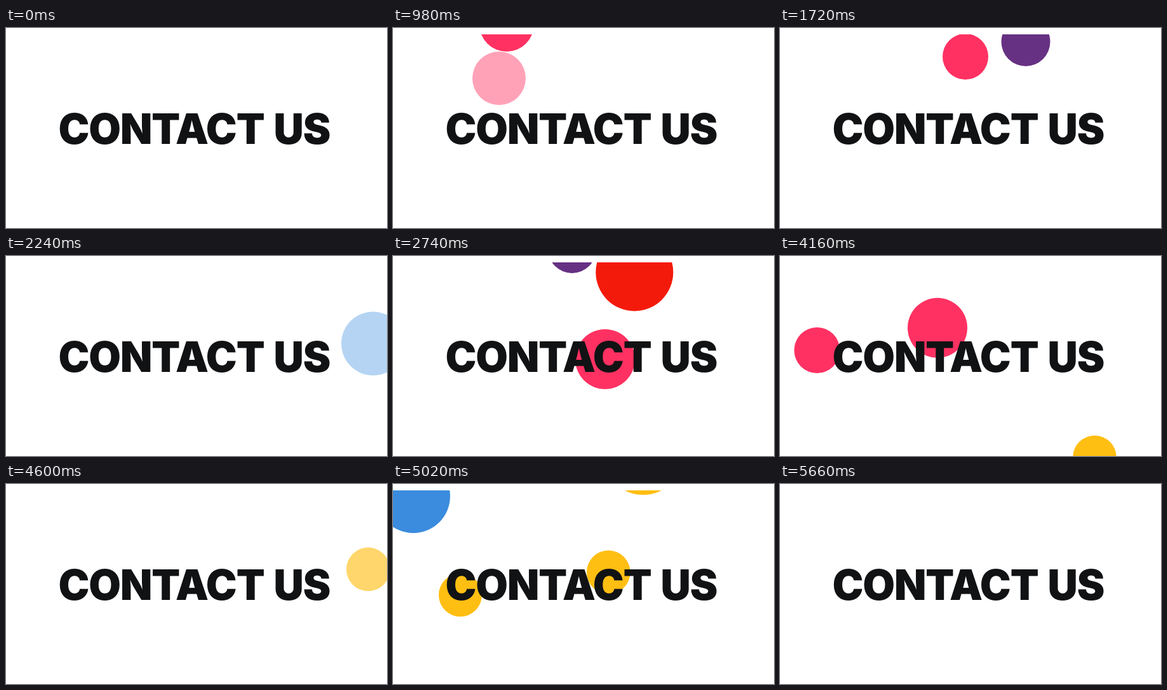
Write an HTML page with a canvas that moves like this. It is 600x314 px and loops after 5700 ms.

```html
<!DOCTYPE html>
<html lang="en">
<head>
<meta charset="utf-8">
<title>Contact us</title>
<style>
  html, body { margin: 0; width: 100%; height: 100%; overflow: hidden; background: #fff; }
  canvas, svg { position: absolute; left: 0; top: 0; width: 600px; height: 314px; }
  text { font: 900 65.5px Inter, "Liberation Sans", sans-serif; letter-spacing: -1.1px; word-spacing: 3px; fill: #111214; }
</style>
</head>
<body>
<canvas width="600" height="314"></canvas>
<svg viewBox="0 0 600 314"><text x="82.4" y="181.8">CONTACT US</text></svg>
<script>
const LOOP = 5700, STEP = 20, CUT = 5660;
const TOP = 10, GRAVITY = 0.0016, ENTRY = 0.25, FADE = 80;
const PINK = '#ff3162', RED = '#f41a0b', PURPLE = '#673183', YELLOW = '#ffbe12', BLUE = '#3b8cde';

// A ball passes (x, y) at time t; by default it has fallen there from the top edge.
function ball(t, x, y, r, color, vx, end = LOOP, vy) {
  vy ??= Math.sqrt(ENTRY ** 2 + 2 * GRAVITY * (y - TOP + r));
  return { t, x, y, r, color, vx, vy, end, start: t - Math.max(0, vy) / GRAVITY };
}

// A ball that enters over the top edge at time t.
const drop = (t, x, r, color, vx, end) => ball(t, x, TOP - r, r, color, vx, end);

const balls = [
  drop(60, 380, 42, PINK, 0.4, 500),
  drop(320, 215, 42, YELLOW, -0.12),
  drop(420, 500, 50, BLUE, 0.2, 900),
  ball(980, 167, 79, 42, PINK, -0.05, 1016),
  ball(980, 179, -6, 43, PINK, -0.12),
  drop(1040, 520, 45, RED, 0.13),
  ball(1720, 292, 45, 36, PINK, -0.3, 1920),
  ball(1720, 387, 21.5, 38.5, PURPLE, 0.3, 1960),
  drop(1740, 90, 40, YELLOW, -0.16, 2110),
  drop(1900, 510, 50, BLUE, 0.2, 2270),
  drop(2250, 70, 40, PINK, -0.12, 2660),
  drop(2330, 485, 45, YELLOW, 0.12, 2700),
  ball(2740, 334, 162, 47, PINK, -0.15),
  ball(2740, 282, -11, 38, PURPLE, -0.2),
  ball(2740, 380.3, 25.5, 61, RED, 0.2),
  drop(2960, 80, 52, BLUE, -0.12, 3480),
  drop(3020, 500, 44, PINK, 0.15),
  drop(3440, 300, 50, RED, -0.1),
  drop(3540, 420, 38, PURPLE, 0.35),
  ball(4160, 58.3, 148, 36, PINK, -0.5),
  ball(4160, 248, 112.8, 47, PINK, 0.1),
  ball(4120, 488.7, 348, 34.3, YELLOW, 0.17, 4650, -0.83),
  ball(5020, 106, 174.3, 34, YELLOW, -0.1, 5130),
  ball(5020, 339.3, 138.5, 34.3, YELLOW, 0.15, 5170),
  ball(5020, 32, 19, 58, BLUE, -0.1, 5250),
  ball(5020, 394, -47, 64, YELLOW, 0.44, 5400),
  drop(5230, 250, 44, PINK, 0.1),
  drop(5300, 420, 40, PURPLE, -0.1)
];

const ctx = document.querySelector('canvas').getContext('2d');
ctx.beginPath();
ctx.rect(0, TOP, 600, 314 - TOP);
ctx.clip();

function draw(time) {
  ctx.clearRect(0, 0, 600, 314);
  if (time >= CUT) return;
  for (const b of balls) {
    if (time < b.start || time >= b.end) continue;
    const s = time - b.t;
    ctx.globalAlpha = Math.min(1, (b.end - time) / FADE);
    ctx.fillStyle = b.color;
    ctx.beginPath();
    ctx.arc(b.x + b.vx * s, b.y + b.vy * s + GRAVITY * s * s / 2, b.r, 0, 2 * Math.PI);
    ctx.fill();
  }
}

const begin = performance.now();
function frame() {
  const time = Math.max(0, performance.now() - begin) % LOOP;
  draw(Math.floor(time / STEP) * STEP);
  requestAnimationFrame(frame);
}
frame();
</script>
</body>
</html>
```
